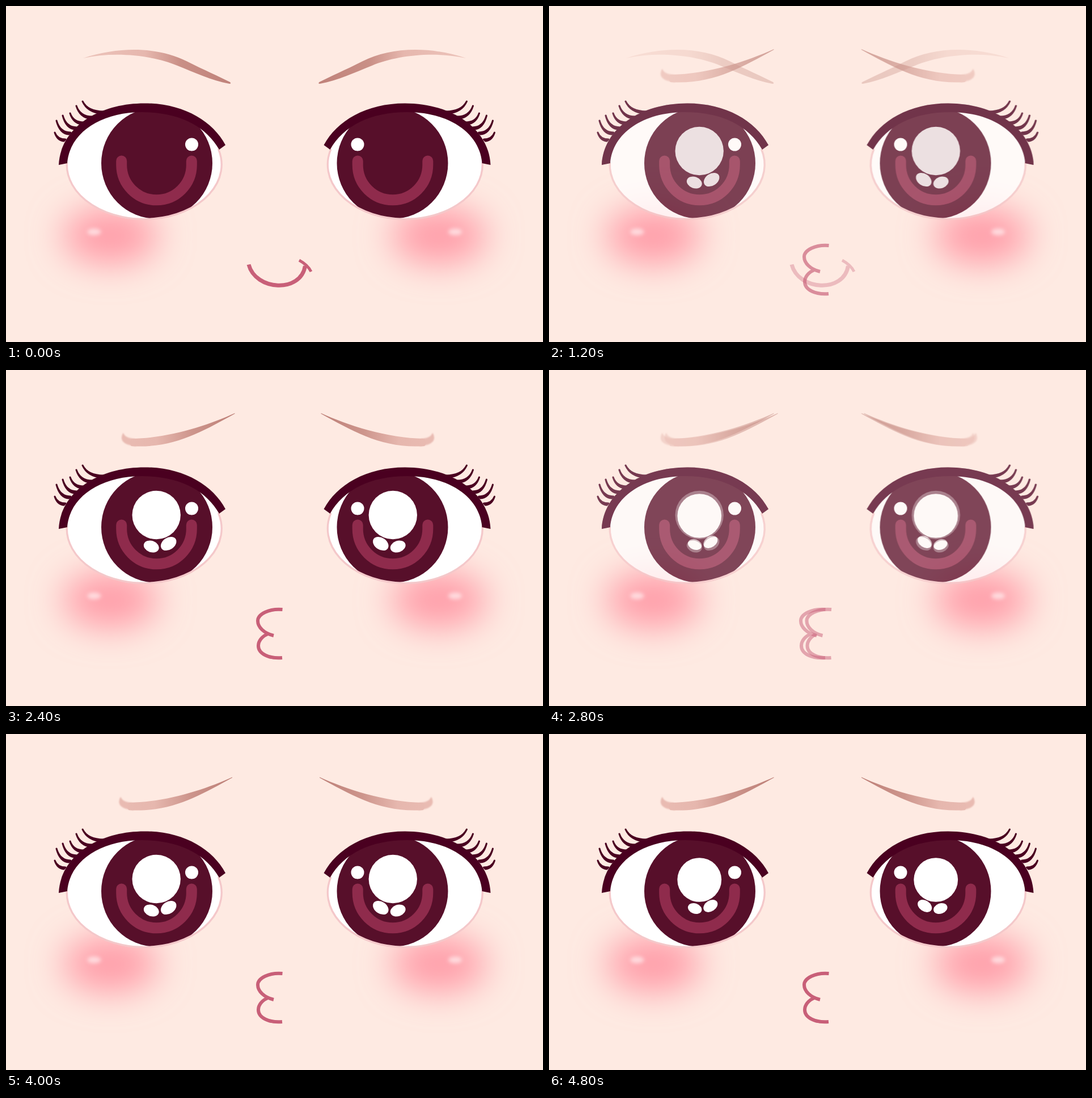
An HTML page that plays this animation: 947x592 px, repeating every 5800 ms.

```html
<!DOCTYPE html>
<html lang="en">
<head>
<meta charset="utf-8">
<title>Blushing face</title>
<style>
  html, body { margin: 0; height: 100%; overflow: hidden; background: #feeae2; }
  svg { display: block; width: 100vw; height: 100vh; }
</style>
</head>
<body>
<svg id="stage" viewBox="0 0 947 592">
  <defs>
    <filter id="haze" x="-100%" y="-150%" width="300%" height="400%"><feGaussianBlur stdDeviation="31"/></filter>
    <filter id="soft" x="-100%" y="-150%" width="300%" height="400%"><feGaussianBlur stdDeviation="3"/></filter>
    <filter id="fuzz" x="-30%" y="-30%" width="160%" height="160%"><feGaussianBlur stdDeviation="1.1"/></filter>
    <linearGradient id="brow" gradientUnits="userSpaceOnUse" x1="136" y1="0" x2="396" y2="0">
      <stop offset="0" stop-color="#ecc3ba"/>
      <stop offset=".42" stop-color="#e6b7ae"/>
      <stop offset=".66" stop-color="#c98f86"/>
      <stop offset="1" stop-color="#c0827a"/>
    </linearGradient>
    <linearGradient id="sadBrow" gradientUnits="userSpaceOnUse" x1="200" y1="0" x2="396" y2="0">
      <stop offset="0" stop-color="#e9bbb2"/>
      <stop offset=".3" stop-color="#e6b7ae"/>
      <stop offset=".62" stop-color="#cd958c"/>
      <stop offset="1" stop-color="#bd7f77"/>
    </linearGradient>
    <clipPath id="eyeClip"><ellipse cx="243.8" cy="280" rx="136.5" ry="96"/></clipPath>

    <g id="blush">
      <ellipse cx="184" cy="405" rx="84" ry="50" fill="#ff9ca8" filter="url(#haze)"/>
      <ellipse cx="155.5" cy="398" rx="12" ry="6" fill="#fff" opacity=".55" filter="url(#soft)"/>
    </g>

    <g id="eye">
      <ellipse cx="243.8" cy="280" rx="136.5" ry="96" fill="#fff"/>
      <g clip-path="url(#eyeClip)">
        <circle cx="266" cy="277" r="98" fill="#570f2a"/>
        <path d="M203.7 273V280A61.8 61.8 0 0 0 327.3 280V273" fill="none" stroke="#8f2b4c" stroke-width="19" stroke-linecap="round"/>
      </g>
      <path fill="none" stroke="#f4c8ca" stroke-width="3.3" d="M107.3 276A136.5 96 0 1 0 374.5 252"/>
      <circle cx="327.5" cy="244" r="11.5" fill="#fff"/>
      <path fill="#4a0020" d="M93 280C96 215 162 171.4 244 171.4C312 171.4 364 202 387 245L376 253C352 211 305 187 240 187C166 187 112 224 108 277Z"/>
      <g id="lashes" fill="#4a0020" stroke="#4a0020" stroke-width="3" stroke-linejoin="round"></g>
    </g>

    <g id="sparkle" fill="#fff">
      <circle cx="265.2" cy="255.5" r="42.7"/>
      <ellipse cx="256.3" cy="311" rx="13.8" ry="10" transform="rotate(20 256.3 311)"/>
      <ellipse cx="286.7" cy="306" rx="15" ry="10.5" transform="rotate(-34 286.7 306)"/>
    </g>

    <path id="firm" fill="url(#brow)" d="M136 92C205 69 272 74 318 97C350 113 375 124 395 134Q398 137 394 137C362 131 332 117 302 105C262 88 195 79 136 92Z"/>
    <g id="sad">
      <path fill="#e9bbb2" filter="url(#fuzz)" d="M200 111Q203 120 220 121L222 134.5Q195 131 197 118Q198 112 200 111Z"/>
      <path fill="url(#sadBrow)" d="M396.5 76C350 97 282 120 214 121Q208 128 214 134C288 139 340 108 396.5 77Z"/>
    </g>

    <g id="smile" fill="none" stroke="#c85f78">
      <path stroke-width="7" d="M428 455.5C440 502 520 506 527.5 458"/>
      <path stroke-width="5" d="M517 448Q532 456 538 468"/>
    </g>
    <path id="kiss" fill="none" stroke="#c85f78" stroke-width="6" d="M493.5 422C470 420 450 430 450 442C450 453 461 464 478 468M469 464.5C457 469 451 478 451 486C451 500 470 509 493 507"/>
  </defs>
</svg>
<script>
const stage = document.getElementById('stage');
const use = (id, dx = 0) => `<use href="#${id}" x="${dx}"/>`;
const flip = s => `<g transform="translate(947.5) scale(-1 1)">${s}</g>`;
const pair = s => s + flip(s);

// each lash: tip x, tip y, root x, root y
const lashes = [
  [135, 168, 172, 186], [124, 176, 152, 195], [113, 189, 137, 205],
  [100, 193, 125, 214], [89, 202, 114, 223], [86, 223, 105, 235]
];
document.getElementById('lashes').innerHTML = lashes.map(([x, y, rx, ry]) => {
  const cx = x + (rx - x) * .24;
  return `<path d="M${x} ${y}Q${cx} ${ry} ${rx} ${ry}L${rx - 3} ${ry + 3}Q${cx} ${ry + 2} ${x} ${y}Z"/>`;
}).join('');

// left and right brow shift, mouth shift, sparkle scale
function pout(left, right, mouth, scale) {
  const sparkle = `<g transform="translate(266 272) scale(${scale}) translate(-266 -272)">${use('sparkle')}</g>`;
  return use('sad', left) + flip(use('sad', -right)) + pair(use('eye') + sparkle) + use('kiss', mouth);
}

const faces = [
  pair(use('firm') + use('eye')) + use('smile'),
  pout(0, 0, 0, 1),
  pout(7, 4.5, -6, 1),
  pout(0, 0, 4.5, .91),
  pout(2.5, 2, -6, 1),
  pout(0, 0, 0, .91)
];
stage.insertAdjacentHTML('beforeend', pair(use('blush')) + faces.map(f => `<g class="face">${f}</g>`).join(''));
const layers = [...document.querySelectorAll('.face')];

// start time, then the opacity of each visible face
const timeline = [
  [0, { 0: 1 }],
  [1000, { 0: 2 / 3, 1: 1 / 3 }],
  [1200, { 0: 1 / 3, 1: 2 / 3 }],
  [1400, { 1: 1 }],
  [2400, { 2: 1 }],
  [2800, { 2: .5, 3: .5 }],
  [3200, { 3: 1 }],
  [3600, { 1: 1 }],
  [4000, { 4: 1 }],
  [4400, { 4: .5, 5: .5 }],
  [4800, { 5: 1 }]
];

const start = performance.now();
let shown;
function draw() {
  const t = Math.max(0, performance.now() - start) % 5800;
  const step = timeline.findLast(([time]) => time <= t);
  if (step !== shown) {
    shown = step;
    layers.forEach((layer, i) => {
      const alpha = step[1][i] || 0;
      layer.style.display = alpha ? '' : 'none';
      layer.style.opacity = alpha;
    });
  }
  requestAnimationFrame(draw);
}
draw();
</script>
</body>
</html>
```
